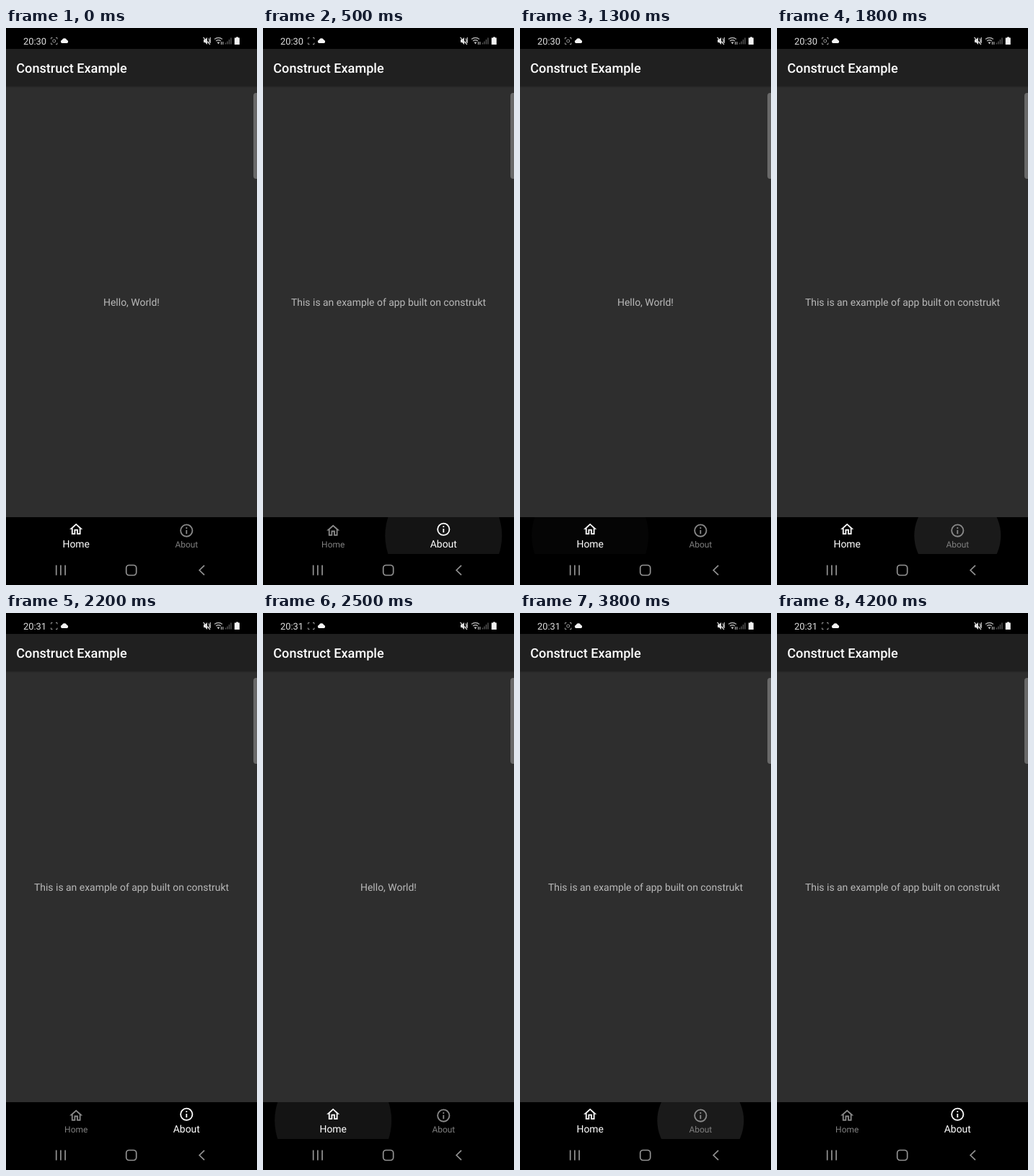
Recreate the animation shown at these times as an HTML page. Size 348 by 772 pixels, loop 4.3 s.

```html
<!DOCTYPE html>
<html lang="en">
<head>
<meta charset="utf-8">
<title>Tab navigation</title>
<style>
  html, body { margin: 0; width: 100%; height: 100%; overflow: hidden; background: #000; }
  svg { display: block; width: 100vw; height: 100vh; }
  text { font-family: Roboto, sans-serif; text-rendering: geometricPrecision; }
  .middle { text-anchor: middle; }
  .line { fill: none; stroke: #929292; stroke-width: 1.7; }
  .thin { fill: none; stroke: #999; stroke-width: 1; }
</style>
</head>
<body>
<svg viewBox="0 0 348 772">
  <defs>
    <clipPath id="bar"><rect y="678" width="348" height="51"/></clipPath>
    <linearGradient id="shade" x2="0" y2="1">
      <stop stop-color="#000" stop-opacity=".3"/>
      <stop offset="1" stop-color="#000" stop-opacity="0"/>
    </linearGradient>
  </defs>

  <rect width="348" height="772"/>
  <rect y="29" width="348" height="51" fill="#202020"/>
  <rect y="80" width="348" height="598" fill="#2e2e2e"/>
  <rect y="80" width="348" height="3" fill="url(#shade)"/>
  <path d="M348 90h-1.5q-3.5 0-3.5 4v111q0 4 3.5 4h1.5z" fill="#696969"/>

  <!-- status bar -->
  <text id="clock" x="24" y="23" font-size="12.9" fill="#dedede"></text>
  <path class="thin" d="M62.5 15.5v-2h2M69 13.5h2v2M71 20.5v2h-2M64.5 22.5h-2v-2"/>
  <circle id="dot" class="thin" cx="66.7" cy="18" r="2"/>
  <path d="M77.5 21a2.4 2.4 0 0 1 .2-4.6 3.6 3.6 0 0 1 6.6 .2 2.3 2.3 0 0 1 .4 4.4z" fill="#f4f4f4"/>
  <path d="M274 16h2l3-3v10l-3-3h-2z" fill="#e2e2e2"/>
  <path d="M273.5 13l9.5 10M281 14.5q2 3.5 0 6.500M283.300 13v8" fill="none" stroke="#d5d5d5" stroke-width="1.1"/>
  <path d="M289 15.500q5.500-4 11 0M291 18q3.500-2.500 7 0" fill="none" stroke="#aaa" stroke-width="1.3"/>
  <path d="M292.500 19.500h4l-2 3z" fill="#c8c8c8"/>
  <path d="M298.500 19v4M300.800 19v4" stroke="#bbb" stroke-width="1.100"/>
  <path d="M304.500 22.500v-2M307 22.500v-4M309.500 22.500v-6.500M312 22.500v-9" stroke="#555" stroke-width="1.400"/>
  <path d="M319 12.500h3v1h1.800v9.500h-7v-9.500h2.200z" fill="#f2f2f2"/>

  <text x="14.300" y="62" font-size="18.100" font-weight="500" fill="#fff">Construct Example</text>
  <text id="message" class="middle" x="174" y="384.700" font-size="13.950" fill="#b9b9b9"></text>

  <!-- tab bar -->
  <g clip-path="url(#bar)"><circle id="ripple" cy="703.500" fill="#fff"/></g>
  <g id="tabs"></g>

  <!-- system navigation -->
  <path class="line" d="M69.700 744.500v14M75.900 744.500v14M82.100 744.500v14"/>
  <rect class="line" x="166.700" y="744.500" width="14" height="14" rx="4"/>
  <path class="line" d="M275 744.800l-6.800 6.700 6.800 6.700"/>
</svg>
<script>
const LOOP = 4300, STEP = 100, ICON_SCALE = 0.906;
const $ = id => document.getElementById(id);

const TABS = [
  { label: 'Home', x: 97.2, message: 'Hello, World!',
    icon: 'M12 5.69l5 4.5V18h-2v-6H9v6H7v-7.81l5-4.5M12 3L2 12h3v8h6v-6h2v6h6v-8h3z' },
  { label: 'About', x: 250.3, message: 'This is an example of app built on construkt',
    icon: 'M11 7h2v2h-2zM11 11h2v6h-2zM12 2a10 10 0 1 0 0 20a10 10 0 1 0 0-20zM12 4a8 8 0 1 1 0 16a8 8 0 1 1 0-16z' },
];
const TAPS = [
  { at: 300, tab: 1 }, { at: 1000, tab: 0 }, { at: 1800, tab: 1 },
  { at: 2300, tab: 0 }, { at: 3800, tab: 1 },
];
// Radius and opacity of the ripple at each step after a tap
const RIPPLE = [[60, 0.1], [81, 0.135], [81, 0.08], [81, 0.02]];
const DOT_HIDDEN = [[500, 600], [1900, 2600], [3200, 3300], [3900, LOOP]];
const MINUTE_AT = 1900;

$('tabs').innerHTML = TAPS && TABS.map(tab =>
  `<g><path fill-rule="evenodd" d="${tab.icon}"/><text class="middle" x="${tab.x}">${tab.label}</text></g>`).join('');
const tabNodes = [...$('tabs').children];

function lastTap(t) {
  return TAPS.filter(tap => tap.at <= t).pop() || { at: -LOOP, tab: 0 };
}

function drawTab(node, i, active) {
  const [icon, label] = node.children;
  const top = (active ? 694.8 : 696.6) - 12 * ICON_SCALE;
  const left = TABS[i].x - 12 * ICON_SCALE;
  icon.setAttribute('transform', `translate(${left} ${top}) scale(${ICON_SCALE})`);
  icon.setAttribute('fill', active ? '#fff' : '#8a8a8a');
  label.setAttribute('y', active ? 720 : 719.7);
  label.setAttribute('font-size', active ? 13.95 : 11.96);
  label.setAttribute('fill', active ? '#fff' : '#808080');
}

function draw(t) {
  const tap = lastTap(t);
  const [radius, opacity] = RIPPLE[(t - tap.at) / STEP] || [0, 0];
  const selected = lastTap(t - STEP).tab;

  $('message').textContent = TABS[tap.tab].message;
  $('ripple').setAttribute('cx', TABS[tap.tab].x);
  $('ripple').setAttribute('r', radius);
  $('ripple').setAttribute('opacity', opacity);
  tabNodes.forEach((node, i) => drawTab(node, i, i === selected));

  $('clock').textContent = t < MINUTE_AT ? '20:30' : '20:31';
  const hidden = DOT_HIDDEN.some(([from, to]) => t >= from && t < to);
  $('dot').setAttribute('opacity', hidden ? 0 : 1);
}

const start = performance.now();
let shown = -1;
function tick() {
  const t = Math.floor(((performance.now() - start) % LOOP) / STEP) * STEP;
  if (t !== shown) draw(shown = t);
  requestAnimationFrame(tick);
}
tick();
</script>
</body>
</html>
```
